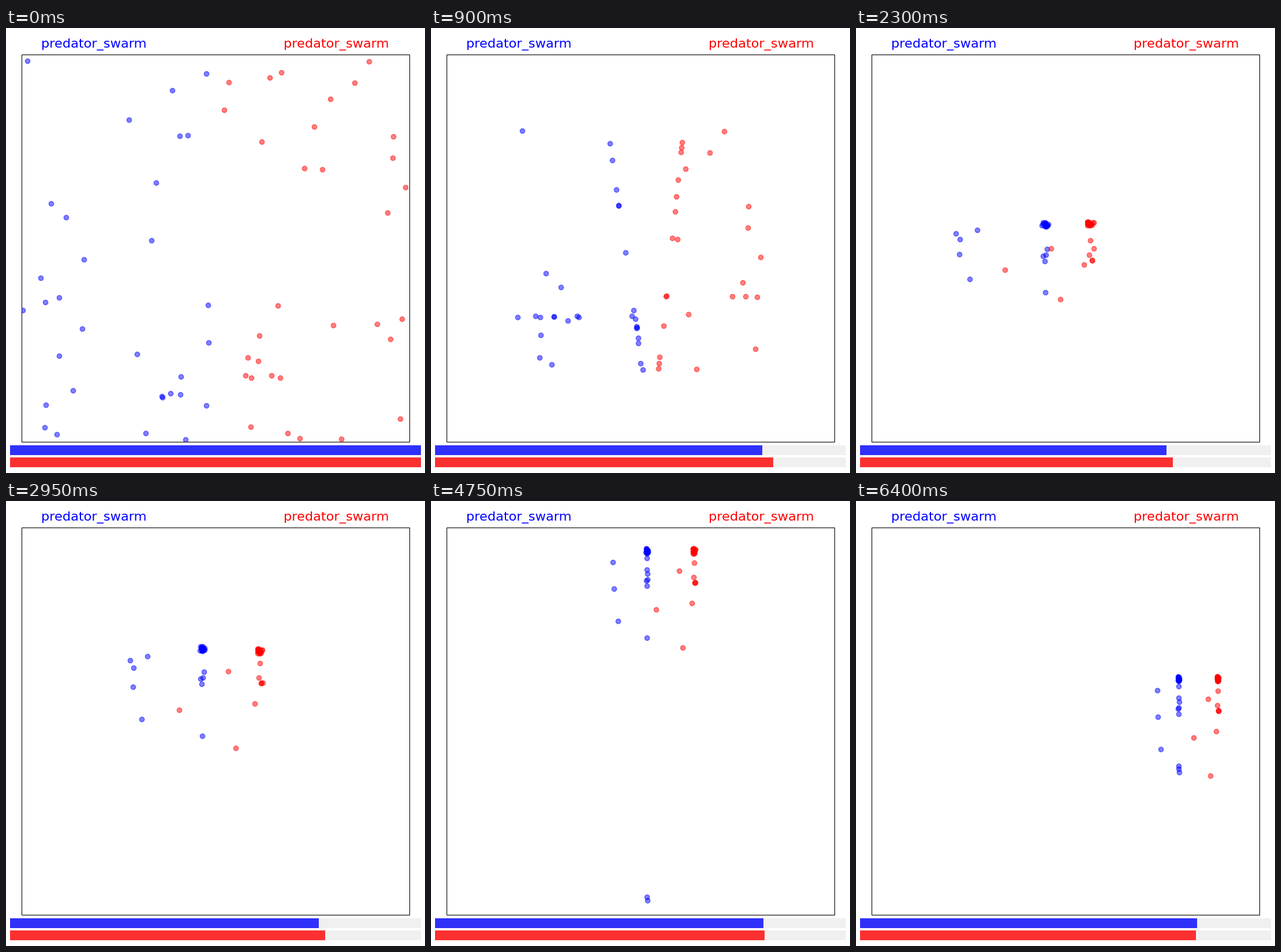
A matplotlib script that plays this animation: 726x771 px, repeating every 6.45 s.

```python
import numpy as np
import matplotlib.pyplot as plt
from matplotlib.animation import FuncAnimation
from matplotlib.patches import Rectangle

W, H, DPI = 726, 771, 100
PX = 72 / DPI
FRAMES, INTERVAL = 129, 50
LEFT, TOP, WIDE, HIGH = 27, 46, 672, 671
V = 6.72                        # largest step per axis and frame
MEET, GATHER, TURN, LOST = 34, 59, 90, 15

# Scattered opening positions: loners first, dots that get lost last.
BLUE_START = [
    (351, 545), (350, 480), (270, 638), (271, 640), (302, 635), (347, 654),
    (311, 713), (88, 704), (242, 702), (67, 692), (37, 57), (347, 79),
    (288, 108), (213, 159), (301, 187), (315, 186), (260, 268), (78, 304),
    (104, 328), (252, 368), (135, 401), (60, 433), (92, 467), (68, 475),
    (29, 489), (132, 521), (92, 568), (227, 565), (116, 628), (69, 653),
    (303, 604), (285, 633)]
RED_START = [
    (567, 515), (424, 691), (437, 577), (517, 243), (548, 245), (581, 712),
    (509, 711), (488, 702), (683, 677), (629, 58), (477, 77), (457, 86),
    (386, 94), (604, 95), (562, 123), (378, 142), (534, 171), (443, 197),
    (671, 188), (670, 225), (692, 276), (661, 320), (643, 513), (686, 504),
    (666, 539), (439, 533), (471, 481), (419, 571), (415, 602), (425, 606),
    (460, 602), (475, 606)]

# Offset from the flock (dx, dy) and whether the loner stays out.
BLUE_LONERS = [(0, 151, 1), (-95, 13, 0), (-125, 20, 1),
               (-119, 33, 0), (-120, 66, 1), (-105, 122, 1)]
RED_LONERS = [(-140, 102, 1), (-55, 0, 1), (-42, 168, 1), (-9, 91, 1), (5, 55, 1)]

# Where each flock heads.
KEYS = [0, 18, MEET, GATHER, 80, TURN, 100, 110, 128]
BLUE_X = [311, 311, 316, 340, 374, 374, 374, 440, 559]
RED_X = [434, 434, 375, 440, 456, 456, 456, 506, 627]
BLUE_Y = [500, 500, 418, 256, 115, 53, 120, 187, 308]
RED_Y = [465, 465, 412, 260, 119, 53, 120, 187, 308]


def step(gap):
    return np.clip(gap, -V, V)


def stray(frame):
    """Share of the sideways offset that loners keep."""
    return np.interp(frame, [18, MEET, 47, GATHER, 80, 100],
                     [0, 0.5, 1.3, 1, 1, 0.3])


def chase(start, loners, path_x, path_y, lean, lost, runaways, seed):
    """Positions of every dot in every frame, as a list of (x, y)."""
    x, y = np.array(start, float).T
    off = np.random.default_rng(seed).normal(size=(len(x), 2)).clip(-1.6, 1.6) * 2.8
    stays = np.ones(len(x))
    n = len(loners)
    off[:n], stays[:n] = np.array(loners)[:, :2], np.array(loners)[:, 2]
    # The runaways miss the turn, leave at the top and return from below.
    last = len(x) - lost
    away = slice(last - runaways, last)
    track = []
    for f in range(FRAMES):
        shown = len(x) if f < LOST else last
        track.append((x[:shown].copy(), (y[:shown] - TOP) % HIGH + TOP))
        t = f + 1
        front = lean * (y - 200) * np.clip((MEET - t) / 16, 0, 1)
        goal_x = np.interp(t, KEYS, path_x) + front
        goal_x = goal_x + off[:, 0] * stray(t) * (stays if t > GATHER else 1)
        goal_y = np.interp(t, KEYS, path_y)
        x = x + step(goal_x - x)
        if t <= GATHER:
            y = y + step(goal_y + off[:, 1] * t / GATHER - y)
        else:
            climb = y[away] - V
            y = y + goal_y - np.interp(f, KEYS, path_y)
            if t > TURN:
                y[away] = climb
    return track


BLUE = chase(BLUE_START, BLUE_LONERS, BLUE_X, BLUE_Y, 0.14, 2, 2, 3)
RED = chase(RED_START, RED_LONERS, RED_X, RED_Y, -0.1, 5, 0, 8)

BAR_X, BAR_W = 7, 712
BAR_KEYS = [0, 11, 18, 26, MEET, 48, GATHER, 80, 110, 128]
BLUE_BAR = [719, 719, 573.5, 579, 555.5, 535, 542, 564.5, 586.5, 591]
RED_BAR = [719, 719, 592.5, 598, 572, 545, 552.5, 569.5, 585.5, 589]

fig = plt.figure(figsize=(W / DPI, H / DPI), dpi=DPI, facecolor="white")
ax = fig.add_axes([0, 0, 1, 1])
ax.set_xlim(0, W)
ax.set_ylim(H, 0)
ax.axis("off")

arena = Rectangle((LEFT, TOP), WIDE, HIGH, fc="none", ec="black", lw=1.1 * PX)
ax.add_patch(arena)


def title(x, color):
    ax.text(x, 34.4, "predator_swarm", color=color, fontsize=22.5 * PX,
            family="DejaVu Sans", ha="center", va="baseline")


def bar(y, color):
    ax.add_patch(Rectangle((BAR_X, y), BAR_W, 17, fc="#f0f0f0", lw=0))
    return ax.add_patch(Rectangle((BAR_X, y), BAR_W, 17, fc=color, alpha=0.8, lw=0))


def dots(color):
    line, = ax.plot([], [], "o", color=color, alpha=0.5, ms=6, mew=1)
    line.set_clip_path(arena)
    return line


title(152, "blue")
title(572, "red")
blue_bar, red_bar = bar(723, "blue"), bar(744, "red")
blue_dots, red_dots = dots("blue"), dots("red")


def draw(frame):
    blue_dots.set_data(*BLUE[frame])
    red_dots.set_data(*RED[frame])
    blue_bar.set_width(np.interp(frame, BAR_KEYS, BLUE_BAR) - BAR_X)
    red_bar.set_width(np.interp(frame, BAR_KEYS, RED_BAR) - BAR_X)
    return blue_dots, red_dots, blue_bar, red_bar


anim = FuncAnimation(fig, draw, frames=FRAMES, interval=INTERVAL,
                     repeat=True, repeat_delay=0)
plt.show()
```
